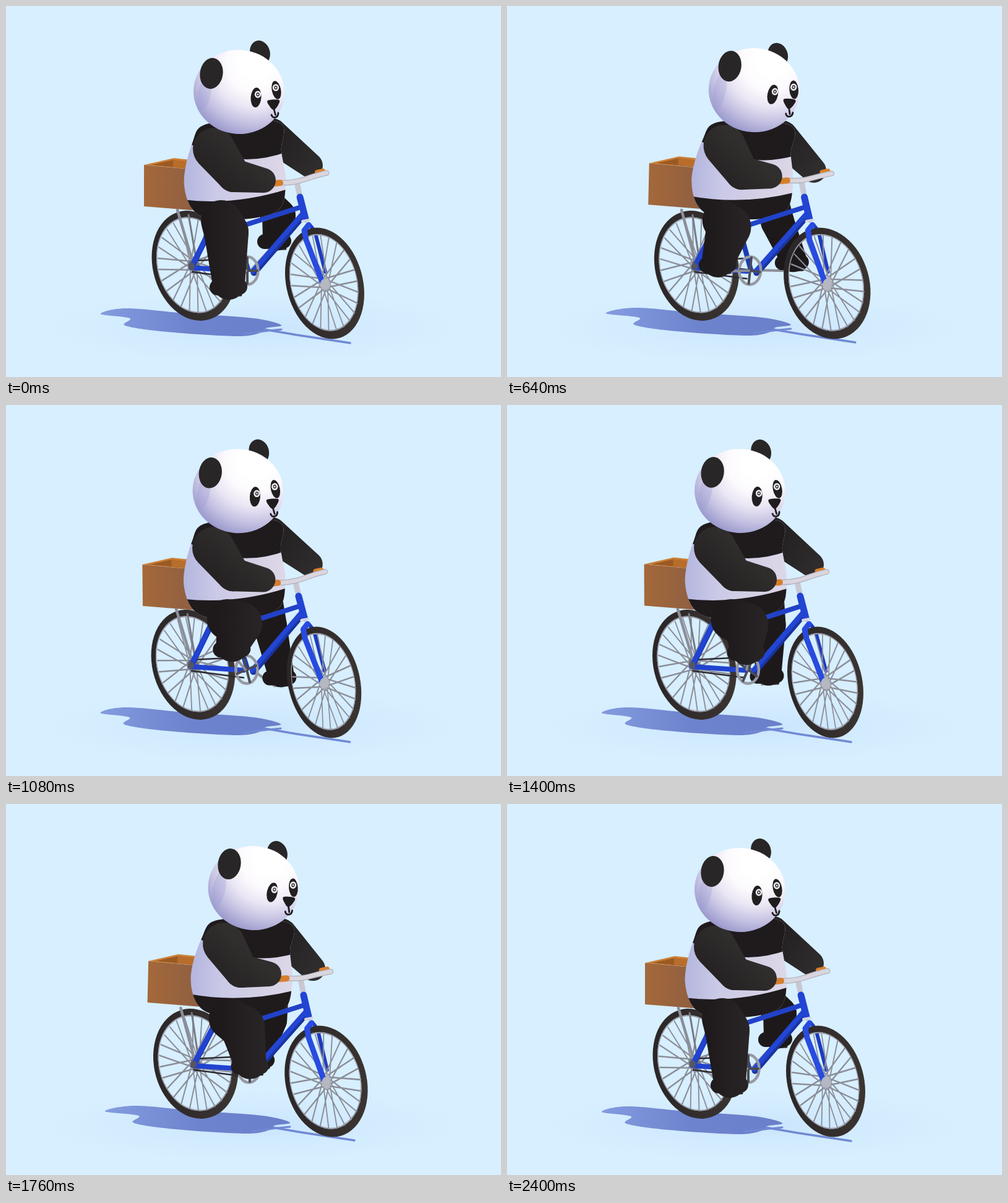
These frames come from a looping animation (800x600 px, 2440 ms). An HTML page with a canvas:

```html
<!DOCTYPE html>
<html lang="en">
<head>
<meta charset="utf-8">
<title>Panda on a bike</title>
<style>
html, body { margin: 0; width: 100%; height: 100%; overflow: hidden; background: #d7efff; }
canvas { display: block; width: 800px; height: 600px; }
</style>
</head>
<body>
<canvas id="stage" width="800" height="600"></canvas>
<script>
const c = document.getElementById('stage').getContext('2d');
const LOOP = 2440, TURN = 2400, STEP = 40, TAU = Math.PI * 2;
const start = performance.now();
let angle = 0; // pedal angle, one turn per loop

// Every motion is a mean plus a swing per pedal turn and one per half turn.
function wave(mean, cos1, sin1, cos2 = 0, sin2 = 0) {
  return mean + cos1 * Math.cos(angle) + sin1 * Math.sin(angle) +
    cos2 * Math.cos(2 * angle) + sin2 * Math.sin(2 * angle);
}

function linear(x1, y1, x2, y2, ...colors) {
  const g = c.createLinearGradient(x1, y1, x2, y2);
  colors.forEach((s, i) => g.addColorStop(i / (colors.length - 1), s));
  return g;
}

function radial(x, y, r, ...colors) {
  const g = c.createRadialGradient(x, y, 0, x, y, r);
  colors.forEach((s, i) => g.addColorStop(i / (colors.length - 1), s));
  return g;
}

function group(draw) {
  c.save();
  draw();
  c.restore();
}

// Shifts what follows and turns it about a pivot.
function turn(x, y, dx, dy, a) {
  c.translate(x + dx, y + dy);
  c.rotate(a);
  c.translate(-x, -y);
}

// Closed smooth path through x, y pairs.
function smooth(...p) {
  const n = p.length / 2;
  const g = i => [p[(i + n) % n * 2], p[(i + n) % n * 2 + 1]];
  c.beginPath();
  c.moveTo(...g(0));
  for (let i = 0; i < n; i++) {
    const [a, b, d, e] = [g(i - 1), g(i), g(i + 1), g(i + 2)];
    c.bezierCurveTo(b[0] + (d[0] - a[0]) / 6, b[1] + (d[1] - a[1]) / 6,
      d[0] - (e[0] - b[0]) / 6, d[1] - (e[1] - b[1]) / 6, ...d);
  }
}

function fill(color) {
  c.fillStyle = color;
  c.fill();
}

function poly(color, ...p) {
  c.beginPath();
  for (let i = 0; i < p.length; i += 2) c.lineTo(p[i], p[i + 1]);
  fill(color);
}

function stroke(color, width) {
  c.strokeStyle = color;
  c.lineWidth = width;
  c.lineCap = c.lineJoin = 'round';
  c.stroke();
}

function tube(color, width, ...p) {
  c.beginPath();
  for (let i = 0; i < p.length; i += 2) c.lineTo(p[i], p[i + 1]);
  stroke(color, width);
}

function oval(color, x, y, rx, ry, a = 0) {
  c.beginPath();
  c.ellipse(x, y, rx, ry, a, 0, TAU);
  fill(color);
}

// Tapered limb between two circles.
function limb(color, x1, y1, r1, x2, y2, r2) {
  const d = Math.atan2(y2 - y1, x2 - x1);
  const f = (r1 - r2) / Math.hypot(x2 - x1, y2 - y1);
  const o = Math.acos(Math.max(-1, Math.min(1, f)));
  c.beginPath();
  c.arc(x1, y1, r1, d + o, d - o + TAU);
  c.arc(x2, y2, r2, d - o, d + o);
  fill(color);
}

function ground() {
  c.fillStyle = '#d7efff';
  c.fillRect(0, 0, 800, 600);
  group(() => {
    c.translate(400, 520);
    c.scale(1, 0.17);
    oval(radial(0, 0, 340, 'rgba(188,216,250,.5)', 'rgba(200,228,253,0)'), 0, 0, 340, 340);
  });
}

function shadow(k) {
  group(() => {
    c.translate(7 * k, -k);
    tube('#7089d4', 3.5, 400, 520, 470, 532, 556, 545);
    c.translate(7 * k, 0);
    smooth(153 - 7 * k, 498, 195, 489, 290, 497, 400, 505, 445, 516, 420, 521, 415, 527,
      375, 534, 260, 527, 193, 517, 200, 505);
    fill(linear(152, 0, 445, 0, '#839bdf', '#6d83cd', '#6b80ca'));
    tube('#7089d4', 3, 385, 530, 425, 525, 445, 523);
  });
}

function wheel(x, y, w, h, skew, hub) {
  group(() => {
    c.transform(w, skew * h, 0, h * Math.sqrt(1 - skew * skew), x, y);
    c.beginPath();
    c.arc(0, 0, 1, 0, TAU);
    c.arc(-0.02, -0.01, 0.87, 0, TAU, true);
    fill(linear(-1, 0, 1, 0, '#2b2627', '#3a3532'));
    c.beginPath();
    c.arc(-0.02, -0.01, 0.86, 0, TAU);
    stroke('#9a9ca8', 0.022);
    c.rotate(angle);
    c.beginPath();
    for (let i = 0; i < 26; i++) {
      const a = i * TAU / 26, b = a + (i % 2 ? 0.8 : -0.8);
      c.moveTo(0.1 * Math.cos(b), 0.1 * Math.sin(b));
      c.lineTo(0.85 * Math.cos(a), 0.85 * Math.sin(a));
    }
    stroke('#8b8d98', 0.028);
    oval(hub, 0, 0, 0.14, 0.11);
    oval('#777984', 0, 0, 0.07, 0.06);
  });
}

// The bike leans sideways about the ground line.
function lean(k, draw) {
  group(() => {
    c.transform(1, 0, -0.025 * k, 1, 548 * 0.025 * k, 0);
    draw();
  });
}

function box(k) {
  c.translate(0, -3 * k);
  poly('#cc7f35', 223, 257, 271, 246, 310, 250, 312, 265);
  poly('#9b5a22', 235, 257, 270, 249, 306, 253, 306, 264);
  poly('#b96d2b', 270, 249, 306, 253, 306, 264, 270, 260);
  poly(linear(223, 0, 305, 0, '#a4683a', '#8f5f42'), 223, 257, 310, 265, 310, 331, 223, 324);
}

function rearBike(k) {
  wheel(303.5, 420, 68 + k, 89, 0.16, '#6d6f78');
  tube('#777a84', 3, 295, 338, 306, 402);
  tube('#8b8e99', 4.5, 277, 330, 301, 412);
  group(() => box(k));
  tube('#2c2a30', 2.5, 303, 412, 385, 408);
  tube('#2c2a30', 2.5, 301, 430, 385, 441);
  tube('#1a38bb', 6, 304, 418, 338, 350);
  tube('#2143cf', 8, 334, 352, 299, 423, 385, 429);
  oval('#55565f', 300, 421, 5, 6);
}

function frontBike(steer, near) {
  tube('#1d3bb4', 8, 391, 426, 372, 362);
  tube('#2142c8', 8, 365, 361, 474, 326);
  tube('#1a349f', 11, 401, 431, 481, 338);
  tube('#2345d4', 8, 399, 429, 479, 336);
  tube('#c9c8d2', 9, 470, 285, 474, 303);
  tube('#2244d2', 11, 475, 309, 484, 344);
  tube('#1c3bc2', 6, 491, 354, 499, 364, 516, 430);
  wheel(515, 448.5, steer, 90, 0.19, '#b3b5c0');
  tube('#284be0', 9, 489, 354, 482, 363, 485, 378, 511, 446);
  tube('#d5d6df', 4, 479, 348, 490, 346);
  oval('#b5b7c1', 515, 450, 7, 9);

  c.beginPath();
  c.ellipse(390, 428, 17.5, 22.5, 0, 0, TAU);
  stroke('#9799a3', 4.5);
  for (let i = 0; i < 4; i++) {
    const a = angle + i * TAU / 4;
    tube('#4a4b53', 4, 390, 428, 390 + 16 * Math.sin(a), 428 - 21 * Math.cos(a));
  }
  tube('#8b8d96', 4, 388, 428, near[0] + 4, near[1] + 10);
}

function bars(k) {
  tube('#dc8129', 8, 503, 269, 512, 267);
  c.beginPath();
  c.moveTo(446 + 4 * k, 286 - 4 * k);
  c.bezierCurveTo(478, 286 - 2 * k, 488, 276, 518, 270 + k);
  stroke('#b2afbc', 9);
  stroke('#d9d6df', 6.5);
  tube('#d67f2c', 10, 432 + 4 * k, 287 - 4 * k, 443 + 4 * k, 286 - 4 * k);
}

function leg(color, hip, knee, [x, y], ankle, shoe, toe) {
  tube('#2b292c', 5, x - 6, y + shoe, x + toe + 2, y + shoe - 1);
  limb(color, ...hip, ...knee);
  limb(color, ...knee, x, y - 6, ankle);
  limb(color, x - 18, y, shoe, x + toe, y - 1, shoe);
}

// Fills the part of the body between a sagging line and a level.
function band(color, left, sag, right, level) {
  c.beginPath();
  c.moveTo(270, left);
  c.quadraticCurveTo(370, sag, 470, right);
  c.lineTo(470, level);
  c.lineTo(270, level);
  fill(color);
}

function torso() {
  smooth(328, 190, 301, 222, 288, 290, 312, 338, 380, 345, 440, 330, 452, 285, 445, 235, 440, 188);
  c.clip();
  c.fillStyle = linear(286, 0, 450, 0, '#b3b5de', '#cbcae7', '#d3cfe4', '#ddd7e7');
  c.fillRect(270, 170, 200, 180);
  band('#1f1b1d', 206, 276, 229, 160);
  band('#1f1a1c', 311, 327, 291, 360);
}

function farArm(k) {
  limb(linear(440, 220, 510, 270, '#242122', '#302e2e'),
    428 + 16 * k, 208 + 4 * k, 27, 492 + 4 * k, 258 + 8 * k, 20);
}

function nearArm(k) {
  const color = linear(320, 290, 380, 225, '#231f20', '#312e2e');
  const elbow = [368 + 12 * k, 274 - 4 * k, 27];
  limb(color, 336 + 16 * k, 231 - 5 * k, 34, ...elbow);
  limb(color, ...elbow, 416 + 9 * k, 282 - 7 * k, 20);
}

function eye(x, y, rx, ry, a, dx, dy) {
  oval('#221f21', x, y, rx, ry, a);
  oval('#f1f0f5', x + dx, y + dy, 5.2, 5.8);
  oval('#4a494f', x + dx, y + dy, 2.8, 3.2);
  oval('#f4f3f7', x + dx, y + dy, 1.2, 1.3);
}

function face() {
  eye(404, 148, 8.5, 16, 0.08, 3, -5);
  eye(437, 136, 7.3, 15, -0.2, -1, -4);
  smooth(423, 153, 441, 152, 440, 160, 433, 168, 426, 162);
  fill('#1f1c1e');
  c.beginPath();
  c.moveTo(433, 167);
  c.lineTo(435.5, 176);
  c.moveTo(429, 176);
  c.bezierCurveTo(431, 183, 440, 181, 440, 173);
  stroke('#1f1c1e', 2.8);
}

function head(k) {
  const ear = '#292627';
  oval(ear, 410.5 + 28 * k, 75.5 + 4 * k, 16, 20, -0.3);
  group(() => {
    c.translate(23.5 * k, -3 * k);
    oval(radial(404, 92, 122, '#fff', '#fff', '#fcfafd', '#eae6f4', '#c6c3e3', '#9c9bcd'),
      376.5, 139, 73.5, 68, 0.08);
    oval('rgba(150,152,208,.28)', 321, 140, 10, 30, 0.2);
  });
  oval(ear, 332 + 29 * k, 109 - 12 * k, 18.5, 25, 0.15);
  turn(432, 159, 24.5 * k, -1.5 * k, 0.13 * k);
  face();
}

function draw() {
  const sway = wave(0.45, 0.11, -0.035, -0.56, -0.1);
  const tilt = wave(0.37, 0.26, -0.04, -0.625, -0.06);
  const steer = wave(65.5, 2.4, 1.7, -3.9, 0.9);
  const near = [wave(367, -7, -27), wave(425, 30, -3)];
  const nearHip = [wave(354, -6, -6), 347, 33];
  const nearKnee = [wave(369, -13, -12), wave(360, 6, -2), 36];
  const far = [wave(436, 0, 27), wave(412, -31, 0)];
  const farHip = [424 + 8 * sway, 318, 24];
  const farKnee = [wave(433, 8, 5), wave(348, -9, 0), 27];

  ground();
  shadow(sway);
  lean(tilt, () => rearBike(tilt));
  farArm(sway);
  tube('#8b8d96', 4, 396, 427, far[0] - 10, far[1] + 13);
  leg('#1d191b', farHip, farKnee, far, 21, 12, 13);
  group(() => {
    turn(375, 310, 9 * sway, 0, 0.07 * sway);
    torso();
  });
  lean(tilt, () => frontBike(steer, near));
  leg(linear(nearKnee[0] - 36, 0, nearKnee[0] + 36, 0, '#1e191b', '#292526'),
    nearHip, nearKnee, near, 26, 13, 17);
  lean(tilt, () => bars(tilt));
  nearArm(sway);
  group(() => head(sway));
}

function tick() {
  const now = (performance.now() - start) % LOOP;
  angle = TAU * Math.floor(now / STEP) * STEP / TURN;
  draw();
  requestAnimationFrame(tick);
}
tick();
</script>
</body>
</html>
```
